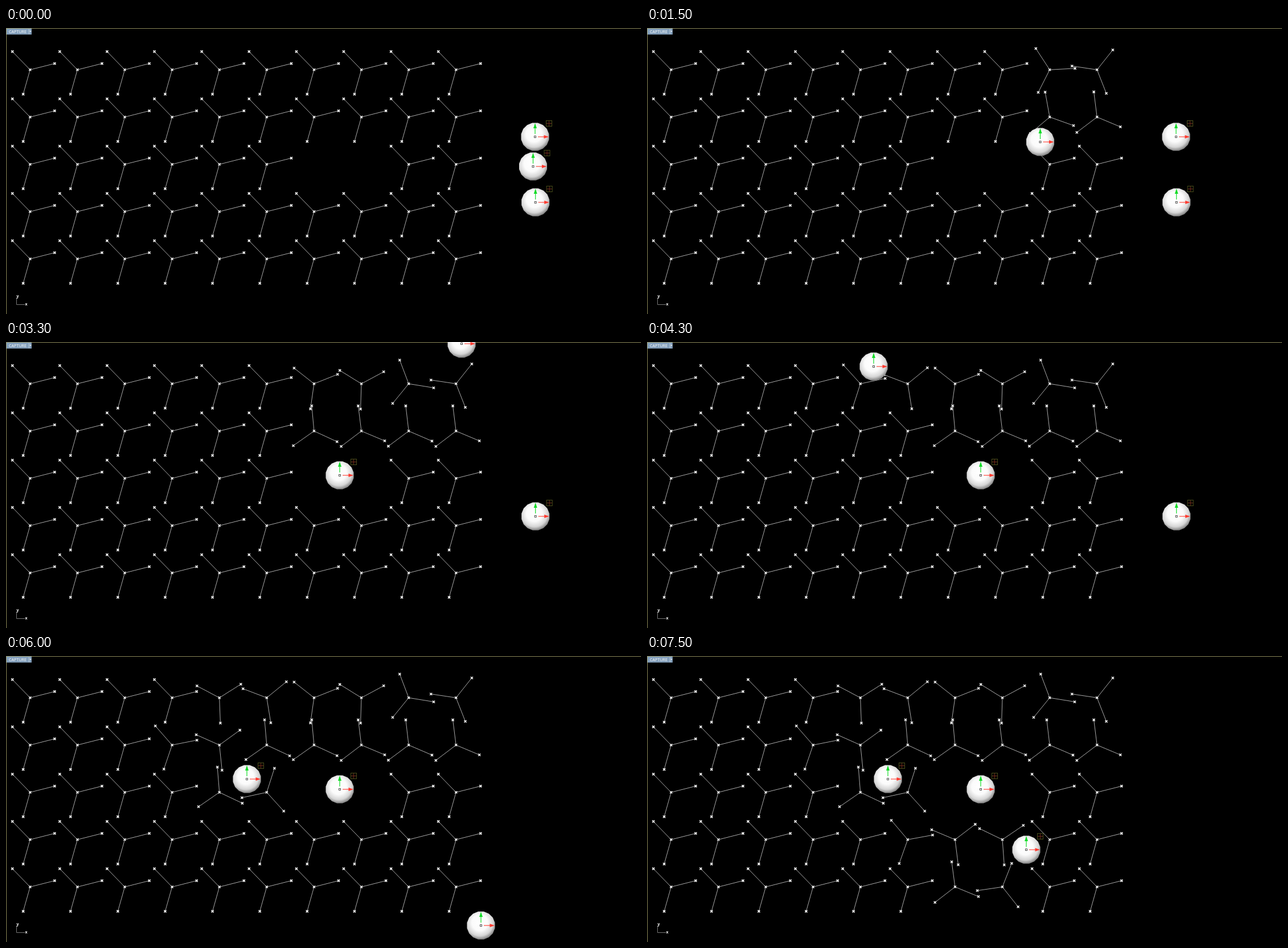
These frames come from a looping animation (1115x502 px, 7600 ms). An HTML page with a canvas:

```html
<!DOCTYPE html>
<html lang="en">
<head>
<meta charset="utf-8">
<title>Rotor grid</title>
<style>
html, body { margin: 0; width: 100%; height: 100%; overflow: hidden; background: #000; }
canvas { display: block; }
</style>
</head>
<body>
<canvas id="stage" width="1115" height="502"></canvas>
<script>
const ctx = document.getElementById('stage').getContext('2d');
const LOOP = 7600, STEP = 100;
const ARM = 44.5, PITCH = 83.1, RADIUS = 25, SWING = 400;

// Drag paths: [time, x, y]
const balls = [
  [[0, 925.5, 243], [900, 782, 196], [2100, 599, 204], [2600, 524, 211], [2900, 586, 234]],
  [[2800, 929, 191], [3300, 800, 3], [3800, 510, -28], [4300, 398, 43], [5300, 423, 223], [5500, 423, 216]],
  [[5600, 929.7, 306], [6000, 834, 473], [6500, 582, 418], [6900, 610, 364], [7300, 666, 340]]
];

// Each pass of a ball swings rotors one after another, lagging by column and row.
// turns: row -> degrees, from column `col` rightwards
const passes = [
  { start: time => 630, turns: {} }
].slice(1).concat([
  { start: (row, col) => 630 + 547 * (9 - col) + 130 * (1 - row),
    turns: { 0: [6, -7.6, -14, 23.4, -37.3], 1: [6, 39, 37, 37.5, 37] } },
  { start: () => 3880, turns: { 0: [5, -25] } },
  { start: row => 4266 + 360 * row,
    turns: { 0: [4, 102], 1: [3, 3, 98.2, -80.7], 2: [4, 39.6, -58] } },
  { start: row => 6350 + 300 * (4 - row),
    turns: { 3: [5, 3.8, -23, -20], 4: [6, -83.4, 65.8] } }
]);

function turn(row, col, t) {
  for (const { start, turns } of passes) {
    const [first, ...angles] = turns[row] || [0];
    const angle = angles[col - first];
    if (angle === undefined) continue;
    const f = Math.min(1, Math.max(0, (t - start(row, col)) / SWING));
    return angle * f * f * (3 - 2 * f);
  }
  return 0;
}

function place(keys, t) {
  const n = keys.findIndex(k => k[0] > t);
  if (n === 0) return keys[0].slice(1);
  if (n < 0) return keys[keys.length - 1].slice(1);
  const [t0, x0, y0] = keys[n - 1], [t1, x1, y1] = keys[n];
  const f = (t - t0) / (t1 - t0);
  return [x0 + (x1 - x0) * f, y0 + (y1 - y0) * f];
}

function path(points, color, width) {
  ctx.beginPath();
  points.forEach(([x, y]) => ctx.lineTo(x, y));
  if (width) {
    ctx.strokeStyle = color;
    ctx.lineWidth = width;
    ctx.stroke();
  } else {
    ctx.fillStyle = color;
    ctx.fill();
  }
}

function polar(r, degrees) {
  const a = degrees * Math.PI / 180;
  return [r * Math.cos(a), r * Math.sin(a)];
}

function mark(x, y) {
  path([[x - 2, y - 2], [x + 2, y + 2]], '#fff', 1.5);
  path([[x + 2, y - 2], [x - 2, y + 2]], '#fff', 1.5);
}

function rotor(x, y, angle) {
  const tips = [0, 1, 2].map(i => {
    const [dx, dy] = polar(ARM, angle - 14.2 + 120 * i);
    return [x + dx, y + dy];
  });
  tips.forEach(tip => path([[x, y], tip], '#bdbdbd', 0.9));
  [[x, y], ...tips].forEach(p => mark(...p));
}

function ball(x, y, handle) {
  ctx.save();
  ctx.translate(x, y);
  const shade = ctx.createRadialGradient(-2, -5, 0, -2, -5, 31);
  shade.addColorStop(0, '#fff');
  shade.addColorStop(0.45, '#fbfbfb');
  shade.addColorStop(0.75, '#d6d6d6');
  shade.addColorStop(1, '#707070');
  path(Array.from({ length: 16 }, (_, i) => polar(RADIUS, 22.5 * i + 11.25)), shade);

  const red = '#ff3b30', green = '#14dc28';
  path([[5, 0], [17, 0]], red, 1.1);
  path([[15.5, -3], [24, 0], [15.5, 3]], red);
  path([[0, -5], [0, -16]], green, 1.2);
  path([[-3, -15], [0, -24], [3, -15]], green);
  ctx.strokeStyle = '#555';
  ctx.lineWidth = 1;
  ctx.strokeRect(-1.5, -1.5, 3, 3);
  if (handle) {
    ctx.strokeStyle = '#474c1a';
    ctx.strokeRect(19.5, -28.5, 10, 10);
    path([[24.5, -28], [24.5, -19]], '#6e2a1c', 1);
    path([[20, -23.5], [29, -23.5]], '#6e2a1c', 1);
  }
  ctx.restore();
}

function viewport() {
  ctx.fillStyle = '#8c8858';
  ctx.fillRect(0, 0, 1115, 1);
  ctx.fillRect(0, 0, 1, 502);
  ctx.fillStyle = '#84a0bc';
  ctx.fillRect(1, 1, 44, 10.5);
  ctx.fillStyle = '#fff';
  ctx.font = '7.2px "Open Sans", sans-serif';
  ctx.fillText('CAPTURE', 5, 8.5);
  path([[40.5, 2], [40.5, 11]], '#d5e0ea', 0.8);
  path([[41.5, 5], [44.5, 5], [43, 7]], '#fff');
  path([[18.5, 473], [18.5, 485.5], [33, 485.5]], '#777', 1);
  ctx.fillStyle = '#fff';
  ctx.font = 'bold 7px "Open Sans", sans-serif';
  ctx.fillText('y', 18.5, 472.5);
  ctx.fillText('x', 33.5, 487);
}

function draw(now) {
  const t = Math.floor(now % LOOP / STEP) * STEP;
  ctx.fillStyle = '#000';
  ctx.fillRect(0, 0, 1115, 502);
  viewport();
  for (let row = 0; row < 5; row++) {
    for (let col = 0; col < 10; col++) {
      const gap = row === 2 && (col === 6 || col === 7);
      if (!gap) rotor(42.3 + col * PITCH, 73.3 + row * 83, turn(row, col, t));
    }
  }
  balls.forEach(keys => {
    const dragged = t > keys[0][0] && t < keys[keys.length - 1][0];
    ball(...place(keys, t), !dragged);
  });
  requestAnimationFrame(() => draw(performance.now() - start));
}

const start = performance.now();
draw(0);
</script>
</body>
</html>
```
